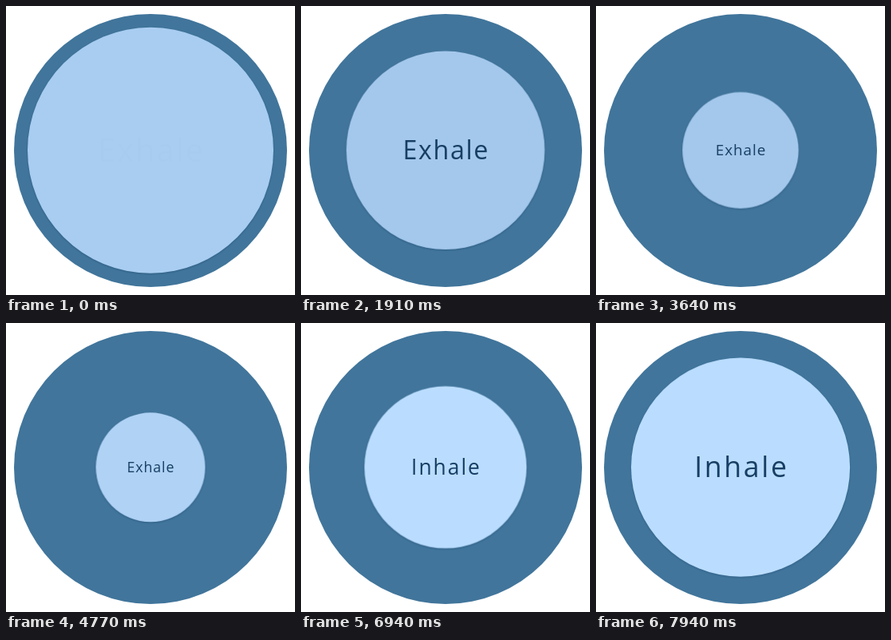
An HTML page that plays this animation: 362 px wide and 362 px high, repeating every 8 s.

```html
<!DOCTYPE html>
<html lang="en">
<head>
<meta charset="utf-8">
<title>Breathing guide</title>
<style>
  html, body { margin: 0; width: 100%; height: 100%; overflow: hidden; background: #fff; }
  svg { display: block; width: 100%; height: 100%; }

  .ring { fill: #41759b; }
  .lift { filter: drop-shadow(0 1.2px 1.2px rgba(20, 60, 100, .4)); }
  .breath { transform-origin: 181px 180.7px; animation: breathe 8s infinite; }
  .disc { animation: tint 8s linear infinite; }

  text {
    font: 400 40px "Open Sans", "Lato", sans-serif;
    fill: #173f63;
    text-anchor: middle;
  }
  .out { letter-spacing: .05em; animation: exhale 8s linear infinite; }
  .in { letter-spacing: .075em; animation: inhale 8s linear infinite; }

  /* the last segment is an ease-in-out cut short by the loop */
  @keyframes breathe {
    0% { transform: scale(1); }
    3.39% { transform: scale(1); animation-timing-function: ease-in-out; }
    53.39% { transform: scale(.4448); }
    65.75% { transform: scale(.4448); animation-timing-function: cubic-bezier(.434, 0, .672, .65); }
    100% { transform: scale(.9007); }
  }
  @keyframes tint {
    0% { fill: #a8cdf1; }
    2.25%, 56.3% { fill: #a4c8ec; }
    63.25%, 100% { fill: #baddff; }
  }
  @keyframes exhale {
    0% { opacity: 0; }
    2.25%, 59.8% { opacity: 1; }
    60.9%, 100% { opacity: 0; }
  }
  @keyframes inhale {
    0%, 61% { opacity: 0; }
    63.25%, 100% { opacity: 1; }
  }
</style>
</head>
<body>
<svg viewBox="0 0 362 362">
  <circle class="ring" cx="181" cy="181" r="171"/>
  <g class="lift">
    <g class="breath">
      <circle class="disc" cx="181" cy="180.7" r="154"/>
      <text class="out" x="182" y="194.5">Exhale</text>
      <text class="in" x="182.5" y="194.5">Inhale</text>
    </g>
  </g>
</svg>
</body>
</html>
```
